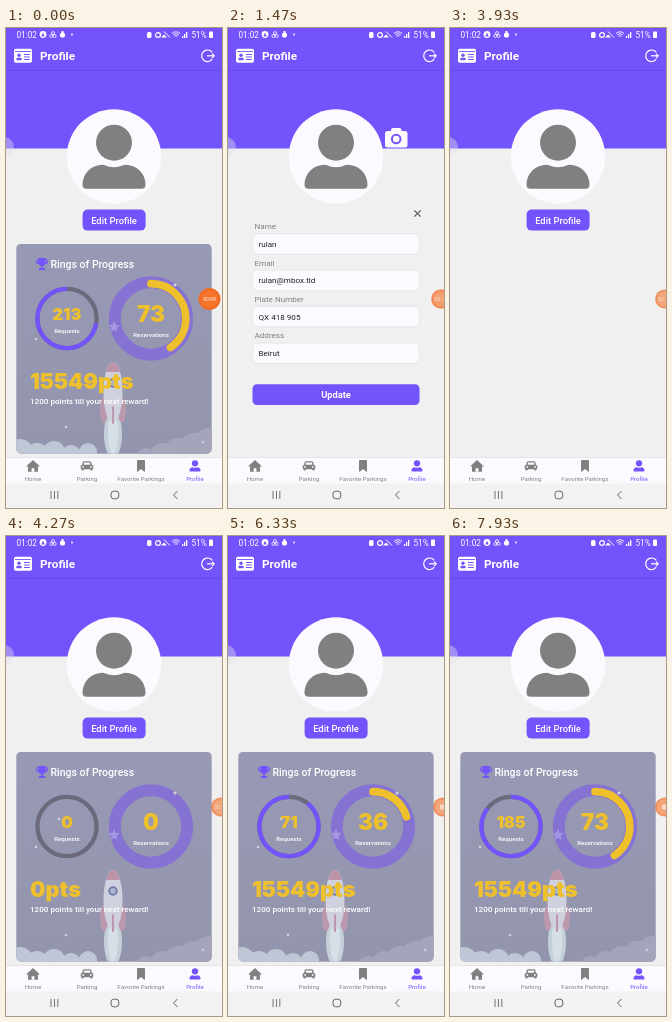
An HTML page with a canvas that plays this animation: 216x480 px, repeating every 8 s.

```html
<!DOCTYPE html>
<html lang="en">
<head>
<meta charset="utf-8">
<title>Profile screen</title>
<style>
html, body { margin: 0; width: 100%; height: 100%; overflow: hidden; background: #f0f0f0; }
canvas { display: block; width: 216px; height: 480px; }
</style>
</head>
<body>
<canvas id="stage"></canvas>
<script>
const W = 216, H = 480, LOOP = 8000, TAU = Math.PI * 2;
const PURPLE = '#7353fb', GRAY = '#808080', PALE = '#fcfafe', GOLD = '#eec02c', PAGE = '#f0f0f0', WHITE = '#fff';
const canvas = document.getElementById('stage');
const ratio = window.devicePixelRatio || 1;
canvas.width = W * ratio;
canvas.height = H * ratio;
const c = canvas.getContext('2d');
c.scale(ratio, ratio);

const span = (t, from, length) => Math.max(0, Math.min(1, (t - from) / length));

// Drawing helpers
function fill(color, path) {
  c.fillStyle = color;
  c.beginPath();
  path();
  c.fill();
}
function stroke(color, width, path) {
  c.strokeStyle = color;
  c.lineWidth = width;
  c.beginPath();
  path();
  c.stroke();
}
const rect = (color, x, y, w, h, r = 0) => fill(color, () => c.roundRect(x, y, w, h, r));
const disc = (color, x, y, r) => fill(color, () => c.arc(x, y, r, 0, TAU));
const oval = (color, x, y, rx, ry) => fill(color, () => c.ellipse(x, y, rx, ry, 0, 0, TAU));
// Arc measured in turns, clockwise from the top
const arc = (color, x, y, r, width, from = 0, to = 1) =>
  stroke(color, width, () => c.arc(x, y, r, (from - .25) * TAU, (to - .25) * TAU));
const line = (color, width, x, y, dx, dy) => stroke(color, width, () => {
  c.moveTo(x, y);
  c.lineTo(x + dx, y + dy);
});
// Triangle with its tip at x, y and its base h below (above when negative)
const tri = (color, x, y, w, h) => fill(color, () => {
  c.moveTo(x, y);
  c.lineTo(x + w / 2, y + h);
  c.lineTo(x - w / 2, y + h);
});
// Chevron with its tip at x, y, pointing away from dx
const chevron = (color, width, x, y, dx, dy) => stroke(color, width, () => {
  c.moveTo(x + dx, y - dy);
  c.lineTo(x, y);
  c.lineTo(x + dx, y + dy);
});
function text(s, x, y, size, color, weight = 400, align = 'left', family = 'Roboto') {
  c.font = `${weight} ${size}px ${family}, sans-serif`;
  c.textAlign = align;
  c.fillStyle = color;
  c.fillText(s, x, y);
}

function person(x, y, s, color) {
  rect(color, x - 31.5 * s, y + 8 * s, 63 * s, 24 * s, [20 * s, 20 * s, 4 * s, 4 * s]);
  disc(PALE, x, y - 14 * s, 24.5 * s);
  disc(color, x, y - 14 * s, 18 * s);
}

function statusBar() {
  text('01:02', 10.5, 9.6, 8.2, WHITE);
  disc(WHITE, 37, 6.5, 3.4);
  tri(PURPLE, 37, 4.5, 3.4, 4);
  for (let i = 0; i < 3; i++) {
    const a = (i / 3 - .25) * TAU;
    arc(WHITE, 47 + 1.9 * Math.cos(a), 7 + 1.9 * Math.sin(a), 1.5, .8);
  }
  disc(WHITE, 56.5, 7, 2.6);
  rect(WHITE, 55.5, 3, 2, 2);
  disc(WHITE, 66, 6.5, .9);

  rect(WHITE, 141, 4, 4.5, 6, 1.5);
  arc(WHITE, 152, 7, 2.4, 1.2);
  tri(WHITE, 158, 6.5, 6, 3);
  line(WHITE, 1, 158, 3.5, 6, 6);
  for (let i = 1; i < 4; i++) {
    arc(WHITE, 170, 9.8, i * 2, .9, -.12, .12);
    rect(WHITE, 174 + i * 2, 10 - i * 2, 1.3, i * 2);
  }
  text('51%', 185.5, 9.6, 8.2, WHITE);
  rect(WHITE, 203, 3.5, 4, 6.5, .8);
}

function header() {
  rect(PURPLE, 0, 0, W, 120.6);
  rect('rgba(40,20,140,.14)', 0, 42, W, 1);
  statusBar();
  rect(WHITE, 8, 20.8, 18, 14, 1.8);
  rect(PURPLE, 9, 23, 16, .9);
  disc(PURPLE, 13, 27.3, 1.7);
  rect(PURPLE, 10.3, 29.7, 5.4, 2.5, 1);
  for (let i = 0; i < 3; i++) rect(PURPLE, 18, 26 + i * 2.5, 5.8, 1);
  text('Profile', 34, 32.2, 11.8, WHITE, 700);
  arc(WHITE, 201.5, 27.8, 5.8, 1.2, .35, 1.15);
  line(WHITE, 1.2, 201, 27.8, 7, 0);
  chevron(WHITE, 1.2, 208.2, 27.8, -2.2, 2.2);
  disc('rgba(226,224,236,.42)', -2, 119, 10);
  disc(PALE, 108, 128.5, 47.2);
  person(108, 128.7, 1, GRAY);
}

function homeIcon(x, y) {
  tri(GRAY, x, y - 6, 14, 6.6);
  rect(GRAY, x - 5, y, 10, 5.8, .6);
  rect(PALE, x - 1.4, y + 2.2, 2.8, 3.6);
}
function carIcon(x, y) {
  rect(GRAY, x - 4.6, y - 4.8, 9.2, 6, 2);
  rect(PALE, x - 3.3, y - 3.5, 6.6, 2.4, .8);
  rect(GRAY, x - 6.3, y - 1.2, 12.6, 4.4, 1.5);
  for (const side of [-1, 1]) {
    rect(GRAY, x + side * 4.4 - 1.1, y + 2, 2.2, 2.4, .6);
    disc(PALE, x + side * 3.9, y + .9, .9);
  }
}
function bookmarkIcon(x, y) {
  rect(GRAY, x - 4, y - 6, 8, 12, 1);
  tri(PALE, x, y + 3, 8, 3.2);
}
const personIcon = (x, y) => person(x, y - .2, .175, PURPLE);

const TABS = [['Home', homeIcon], ['Parking', carIcon], ['Favorite Parkings', bookmarkIcon], ['Profile', personIcon]];

function tabs() {
  rect(PALE, 0, 429, W, 27);
  rect('#dedee2', 0, 429, W, .8);
  TABS.forEach(([name, icon], i) => {
    const x = 27 + i * 54;
    icon(x, 438);
    text(name, x, 453, 6.15, icon === personIcon ? PURPLE : GRAY, 400, 'center');
  });
  rect('#f2f2f3', 0, 455.5, W, 25);
  for (let i = 0; i < 3; i++) rect('#666', 44.6 + i * 3.4, 463, .9, 8);
  stroke('#666', 1, () => c.roundRect(105, 463.2, 7.8, 7.6, 2.8));
  chevron('#666', 1, 167.6, 467, 3.8, 4);
}

function editButton(alpha) {
  c.globalAlpha = alpha;
  rect(PURPLE, 76.6, 181.6, 63, 21, 5);
  text('Edit Profile', 108, 195.6, 9.4, WHITE, 500, 'center');
  c.globalAlpha = 1;
}

function star(x, y, r, color) {
  fill(color, () => {
    for (let i = 0; i < 10; i++) {
      const a = (i / 10 - .25) * TAU, d = i % 2 ? r * .45 : r;
      c.lineTo(x + d * Math.cos(a), y + d * Math.sin(a));
    }
  });
}

function rocket(x, y) {
  oval('#c4d0da', x, y + 72, 9, 24);
  oval('#d6dfe5', x, y + 70, 5, 22);
  for (const side of [-1, 1]) oval('#bb98ac', x + side * 9, y + 48, 4, 13);
  oval('#d0d1df', x, y + 30, 9.5, 30);
  c.save();
  c.beginPath();
  c.rect(x - 10, y, 20, 10);
  c.clip();
  oval('#bd93a8', x, y + 30, 9.5, 30);
  c.restore();
  disc('#7478a5', x, y + 21, 4.7);
  disc('#a6b4cf', x, y + 21, 3);
  rect('#bb98ac', x - 1, y + 44, 2, 18, 1);
}

function scenery() {
  const sky = c.createLinearGradient(0, 216, 0, 426);
  sky.addColorStop(0, '#9899b5');
  sky.addColorStop(1, '#9395ad');
  rect(sky, 10, 216, 196, 210);
  for (let i = 0; i < 5; i++) {
    disc('#a4a4ba', 140 + i * 16, 430 - i * 3, 10 + i * 2);
    disc('#bfc7d6', 14 + i * 17, 424 + 3 * (i % 2), 13 - i);
  }
  for (const [x, y] of [[30, 311], [53, 283], [60, 399], [197, 414]]) disc('#cfd0e0', x, y, 1.3);
  rocket(107, 334);
}

function trophy(x, y) {
  for (const side of [-1, 1]) arc(PURPLE, x + side * 3.5, y - 2.5, 2, 1.1);
  rect(PURPLE, x - 3.7, y - 6, 7.4, 8, [0, 0, 3.7, 3.7]);
  rect(PURPLE, x - .8, y + 1, 1.6, 4);
  rect(PURPLE, x - 3.2, y + 4, 6.4, 2, .6);
}

// Dash of one full turn on, one off: past 100% the arc is eaten from its start.
function wrapArc(x, y, share) {
  const part = share % 1, eaten = Math.floor(share) % 2;
  arc(PURPLE, x, y, 29.6, 4.3, eaten ? part : 0, eaten ? 1 : part);
}

function card(requests, reservations, points) {
  const y = 290.5, left = 61, right = 145;
  const number = (v, x, base, size) => text(Math.floor(v), x, base, size, GOLD, 900, 'center', 'Inter');
  c.save();
  c.beginPath();
  c.roundRect(10.3, 215.8, 195.4, 210, 5);
  c.clip();
  scenery();
  c.restore();
  trophy(36, 236);
  text('Rings of Progress', 44.5, 240.3, 10.5, WHITE, 500);

  arc('#6b697b', left, y, 29.6, 4.3);
  wrapArc(left, y, requests / 65);
  number(requests, left, 292.2, 16.4);
  text('Requests', left, 305.2, 6.1, WHITE, 500, 'center');

  arc('#8672d3', right, y, 36.2, 12);
  star(108, 299, 6, '#a598e2');
  disc('#cfd0e0', 169, 257, 1.6);
  if (reservations > 0) {
    c.lineCap = 'round';
    arc(GOLD, right, y, 34.8, 7.7, 0, reservations / 180);
    c.lineCap = 'butt';
  }
  number(reservations, right, 294.4, 22.4);
  text('Reservations', right, 309.2, 6.1, WHITE, 500, 'center');

  text(Math.floor(points) + 'pts', 24, 361.2, 21.8, GOLD, 900, 'left', 'Inter');
  text('1200 points till your next reward!', 24, 376, 8.1, WHITE, 500);
}

const FIELDS = [['Name', 'rulan'], ['Email', 'rulan@mbox.tld'], ['Plate Number', 'QX 418 905'], ['Address', 'Beirut']];

function form(filled) {
  rect(PALE, 157, 103, 22.5, 16.5, 2.5);
  rect(PALE, 163, 100, 10.5, 6, 2);
  arc(PURPLE, 168.2, 111, 4.3, 2);
  for (const side of [-1, 1]) line('#555', 1.2, 189.5 - side * 3.2, 182.3, side * 6.4, 6.4);
  FIELDS.forEach(([label, value], i) => {
    const y = 206 + i * 36.4;
    text(label, 26.5, y - 4.8, 8.1, GRAY);
    rect('#e2e1ea', 24.5, y - .5, 167, 21, 4.5);
    rect(PALE, 25.2, y + .2, 165.6, 19.6, 4);
    if (filled) text(value, 30.5, y + 13, 8.1, '#222');
  });
  rect(PURPLE, 24.5, 356.3, 167, 20.8, 4.5);
  text('Update', 108, 370.3, 9.3, WHITE, 700, 'center');
}

// Recording bubble: slides to the edge and fades
function bubble(t) {
  const p = span(t, 1070, 530), e = p * p * (3 - 2 * p);
  const x = 203.5 + 11 * e, y = 271, r = 11 - 1.5 * e;
  c.globalAlpha = 1 - .4 * e;
  disc('#f5742a', x, y, r);
  arc('#e5571c', x, y, r - 1.2, .7);
  if (t >= 4870) rect(WHITE, x - 2.5, y - 2.5, 5, 5, 1.8);
  else text('00:' + String(9 + Math.floor((t + 70) / 1000)).padStart(2, '0'), x, y + 1.8, 5, WHITE, 400, 'center');
  c.globalAlpha = 1;
}

function draw(t) {
  const opened = 330, saved = 3930, loaded = 4270, counting = 5318;
  rect(PAGE, 0, 0, W, H);
  header();
  if (t >= opened && t < saved) form(t >= 1070);
  else {
    editButton(t < opened ? 1 - .75 * span(t, 70, 150) : 1);
    if (t < opened) card(213, 73, 15549);
    else if (t >= loaded) card(
      213 * span(t, counting, 3000),
      73 * span(t, counting, 2000),
      15549 * span(t, 5130, 470)
    );
  }
  tabs();
  bubble(t);
}

const start = performance.now();
function tick() {
  draw((performance.now() - start) % LOOP);
  requestAnimationFrame(tick);
}
tick();
</script>
</body>
</html>
```
